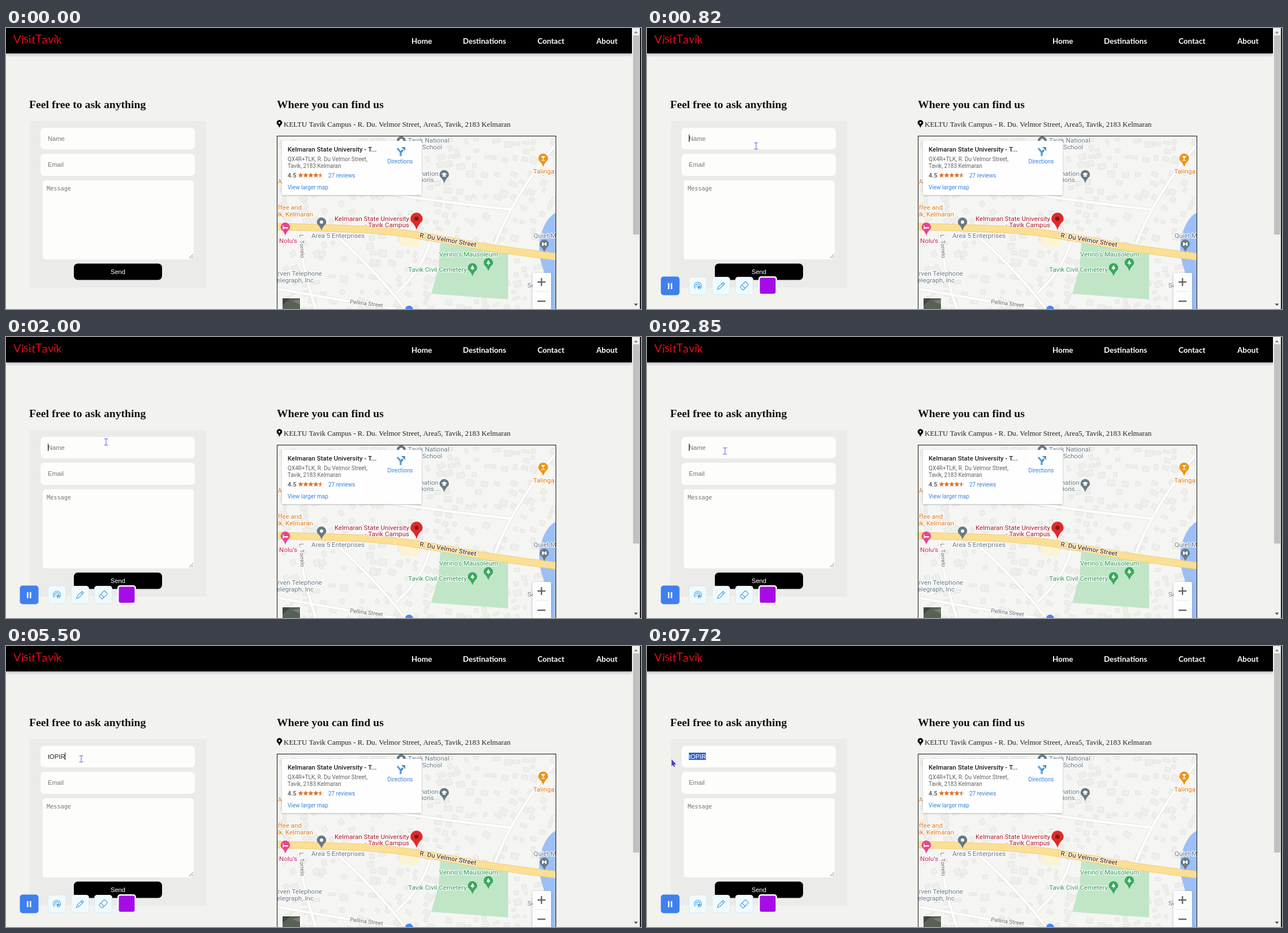
An HTML page with a canvas that plays this animation: 1123 px wide and 498 px high, repeating every 8 s.

```html
<!DOCTYPE html>
<html lang="en">
<head>
<meta charset="utf-8">
<title>Contact page</title>
<style>
html, body { margin: 0; width: 100%; height: 100%; overflow: hidden; background: #f2f2ef; }
canvas { display: block; width: 1123px; height: 498px; }
</style>
</head>
<body>
<canvas id="stage" width="1123" height="498"></canvas>
<script>
const W = 1123, H = 498, LOOP = 8000;
const SANS = '"Liberation Sans", Arial, sans-serif';
const SERIF = '"Liberation Serif", Times, serif';
const MONO = '"DejaVu Sans Mono", monospace';
const MAPFONT = 'Roboto, sans-serif';
const NAVFONT = 'Lato, sans-serif';
const PAGE = '#f2f2ef', LAND = '#f5f5f3', SLATE = '#677a86';
const GREEN = '#36985a', ORANGE = '#d97918';

const screen = document.getElementById('stage').getContext('2d');
const page = document.createElement('canvas');
page.width = W;
page.height = H;
let g = page.getContext('2d');

function text(str, x, y, font, color, align = 'left') {
  g.font = font;
  g.fillStyle = color;
  g.textAlign = align;
  g.fillText(str, x, y);
}

function box(x, y, w, h, color, r = 0) {
  g.fillStyle = color;
  g.beginPath();
  g.roundRect(x, y, w, h, r);
  g.fill();
}

function disc(x, y, r, color) {
  g.fillStyle = color;
  g.beginPath();
  g.arc(x, y, r, 0, Math.PI * 2);
  g.fill();
}

function trace(pts, close) {
  g.beginPath();
  pts.forEach(([x, y]) => g.lineTo(x, y));
  if (close) g.closePath();
}

function shape(pts, color) {
  trace(pts, true);
  g.fillStyle = color;
  g.fill();
}

function line(pts, color, width) {
  trace(pts);
  g.strokeStyle = color;
  g.lineWidth = width;
  g.stroke();
}

// Smooth stroke that runs through the midpoints of the inner key points.
function curve(pts, color, width) {
  g.beginPath();
  g.moveTo(...pts[0]);
  for (let i = 1; i < pts.length - 1; i++) {
    const [x, y] = pts[i], [nx, ny] = pts[i + 1];
    const k = i === pts.length - 2 ? 1 : 0.5;
    g.quadraticCurveTo(x, y, x + (nx - x) * k, y + (ny - y) * k);
  }
  g.strokeStyle = color;
  g.lineWidth = width;
  g.stroke();
}

function shadowed(blur, dy, color, draw) {
  g.save();
  g.shadowColor = color;
  g.shadowBlur = blur;
  g.shadowOffsetY = dy;
  draw();
  g.restore();
}

function turned(x, y, angle, draw) {
  g.save();
  g.translate(x, y);
  g.rotate(angle);
  draw();
  g.restore();
}

function clipped(x, y, w, h, draw) {
  g.save();
  g.beginPath();
  g.rect(x, y, w, h);
  g.clip();
  draw();
  g.restore();
}

function label(str, x, y, color, align = 'left', size = 11.6, weight = 400) {
  const font = `${weight} ${size}px ${MAPFONT}`;
  g.font = font;
  g.textAlign = align;
  g.lineJoin = 'round';
  g.lineWidth = 2.5;
  g.strokeStyle = 'rgba(255,255,255,.85)';
  g.strokeText(str, x, y);
  text(str, x, y, font, color, align);
}

function marker(x, y, r, color) {
  g.fillStyle = color;
  g.beginPath();
  g.arc(x, y, r, Math.PI * 0.88, Math.PI * 0.12);
  g.quadraticCurveTo(x + r * 0.25, y + r, x, y + r * 1.8);
  g.quadraticCurveTo(x - r * 0.25, y + r, x - r * 0.95, y + r * 0.37);
  g.fill();
}

function drawHeader() {
  shadowed(5, 2, 'rgba(80,70,110,.4)', () => box(0, 0, 1107, 45, '#000'));
  const font = '400 20px ' + NAVFONT;
  let x = 13;
  [...'VisitTavik'].forEach((ch, i) => {
    turned(x, 27 + Math.sin(i * 2.3), Math.sin(i * 1.9) * 0.07,
      () => text(ch, 0, 0, font, '#e00d18'));
    g.font = font;
    x += g.measureText(ch).width;
  });
  text('Home', 717, 28, '700 13.5px ' + NAVFONT, '#fff');
  text('Destinations', 808, 28, '700 13.5px ' + NAVFONT, '#fff');
  text('Contact', 940, 28, '700 13.5px ' + NAVFONT, '#fff');
  text('About', 1044, 28, '700 13.5px ' + NAVFONT, '#fff');
}

function drawForm() {
  text('Feel free to ask anything', 41, 142, 'bold 19.7px ' + SERIF, '#111');
  box(42, 165, 312, 295, '#ebebea');
  box(61, 177, 273, 38, '#fdfdfc', 7);
  box(61, 223, 273, 39, '#fdfdfc', 7);
  box(65, 270, 267, 140, '#fdfdfc', 5);
  text('Email', 74, 246, '11.2px ' + SANS, '#757575');
  text('Message', 72, 288, '10.2px ' + MONO, '#757575');
  line([[324, 408], [331, 401]], '#777', 1);
  line([[328, 408], [331, 405]], '#777', 1);
  box(120, 417.5, 156, 29, '#000', 7);
  text('Send', 198, 436, '11.2px ' + SANS, '#fff', 'center');
}

// Houses on a jittered grid, thinned at random and tilted like the land around them.
function drawHouses() {
  let seed = 29;
  const rnd = () => (seed = (seed * 16807) % 2147483647) / 2147483647;
  for (let y = 196; y < H; y += 14) {
    for (let x = 484; x < 968; x += 17) {
      if (rnd() > 0.5) continue;
      const w = 5 + rnd() * 9, h = 5 + rnd() * 7;
      turned(x + rnd() * 8, y + rnd() * 6, Math.sin(x / 90 + y / 70) * 0.5, () => {
        box(0, 0, w, h, '#eeeeec');
        g.strokeStyle = '#e2e1d8';
        g.lineWidth = 0.8;
        g.strokeRect(0, 0, w, h);
      });
    }
  }
}

function drawRoads() {
  const lanes = [
    [[517, 355], [522, 420], [548, 498]],
    [[572, 357], [650, 425], [706, 498]],
    [[862, 390], [895, 300], [973, 205]],
    [[640, 288], [750, 306], [894, 322]],
    [[479, 462], [600, 484], [690, 498]],
    [[690, 470], [735, 430], [750, 378]]
  ];
  lanes.forEach(p => curve(p, '#e0e0df', 6));
  lanes.forEach(p => curve(p, '#fefefe', 4.5));
  const main = [[474, 352], [600, 355], [690, 361], [780, 376], [860, 391], [978, 406]];
  curve(main, '#efcf78', 13);
  curve(main, '#fbdf94', 11);
}

function drawWater() {
  g.fillStyle = '#9cbff5';
  g.beginPath();
  g.moveTo(973, 327);
  g.bezierCurveTo(955, 335, 943, 365, 943, 390);
  g.bezierCurveTo(943, 425, 962, 440, 962, 498);
  g.lineTo(973, 498);
  g.fill();
}

function treeMarker(x, y) {
  marker(x, y, 8.3, '#39a85c');
  shape([[x - 3.5, y + 2], [x, y - 5], [x + 3.5, y + 2]], '#fff');
  box(x - 0.6, y + 2, 1.2, 2.5, '#fff');
}

function drawPlaces() {
  marker(699, 200, 8, SLATE);
  disc(699, 200, 3.5, '#fff');
  label('Tavik National', 784, 203, SLATE, 'right');
  label('School', 736, 215, SLATE);
  label('Examination', 765, 262, SLATE, 'right');
  label('Institutions...', 766, 273, SLATE, 'right');
  marker(775, 260, 8.3, SLATE);
  shape([[770, 259], [775, 256], [780, 259], [775, 262]], '#fff');
  box(772, 261.5, 6, 2, '#fff');

  marker(950, 231, 8.5, '#ee9513');
  shape([[946, 227], [954, 227], [950, 231.5]], '#fff');
  box(949.4, 230, 1.2, 5, '#fff');
  box(947, 234, 6, 1.2, '#fff');
  label('Talinga', 951, 258, ORANGE, 'center');
  label('A', 488, 276, ORANGE, 'right');
  label('Coffee and', 523, 322, ORANGE, 'right');
  label('Tavik, Kelmaran', 543, 334, ORANGE, 'right');

  marker(494, 353, 8.3, '#e8458b');
  box(489.5, 350, 1.3, 7, '#fff');
  box(490, 353, 9, 2.4, '#fff');
  label('Nolu\u2019s', 499, 381, '#c2235f', 'center');
  marker(558, 344, 8.3, SLATE);
  disc(558, 344, 3, '#fff');
  label('Area 5 Enterprises', 540, 372, SLATE);

  marker(952, 383, 8, SLATE);
  box(948, 380, 2.6, 6, '#fff');
  box(953.4, 380, 2.6, 6, '#fff');
  box(950, 382, 4, 2, '#fff');
  label('Quiet M', 933, 372, SLATE);
  label('Se', 922, 460, SLATE);

  label('Verino\u2019s Mausoleum', 766, 405, GREEN);
  label('Tavik Civil Cemetery', 815, 432, GREEN, 'right');
  treeMarker(853, 416);
  treeMarker(825, 425);

  label('Orven Telephone', 559, 439, SLATE, 'right');
  label('Telegraph, Inc', 544, 451, SLATE, 'right');
  turned(519, 366, Math.PI / 2 - 0.05, () => label('L. Torrelo', 0, 0, '#666', 'left', 10));
  turned(608, 488, 0.12, () => label('Pellina Street', 0, 0, '#666', 'left', 10));
  turned(731, 371, 0.17, () => label('R. Du Velmor Street', 0, 0, '#644023', 'left', 11.6, 500));

  marker(726, 338, 10.8, '#dd2b2b');
  disc(726, 338, 3.8, '#8c1518');
  label('Kelmaran State University', 713, 342, '#a9182b', 'right');
  label('- Tavik Campus', 713, 353, '#a9182b', 'right');
}

function star(cx, cy, r, color) {
  const pts = Array.from({ length: 10 }, (_, i) => {
    const a = -Math.PI / 2 + i * Math.PI / 5, d = i % 2 ? r * 0.45 : r;
    return [cx + d * Math.cos(a), cy + d * Math.sin(a)];
  });
  shape(pts, color);
}

function drawStars(color) {
  for (let i = 0; i < 5; i++) star(521 + i * 9, 261, 4.8, color);
}

function drawCard() {
  const small = '10px ' + MAPFONT, blue = '#3a82dc';
  shadowed(3, 1, 'rgba(0,0,0,.25)', () => box(488, 200, 247, 96, '#fefefe', 1));
  text('Kelmaran State University - T...', 498, 219, '500 11.5px ' + MAPFONT, '#1f1f1f');
  text('QX4R+TLK, R. Du Velmor Street,', 498, 236, small, '#636363');
  text('Tavik, 2183 Kelmaran', 498, 248, small, '#636363');
  text('4.5', 498, 265, '500 11px ' + MAPFONT, '#555');
  drawStars('#ddd');
  clipped(516, 255, 41, 12, () => drawStars('#e27126'));
  text('27 reviews', 570, 265, small, blue);
  text('View larger map', 498, 286, small, blue);
  text('Directions', 697, 240, small, blue, 'center');
  line([[698, 227], [698, 220], [692, 213]], '#5fa0d6', 3.4);
  line([[698, 221], [702, 216]], '#4a8fcd', 3.4);
  shape([[699, 211], [706, 211], [706, 218]], '#4a8fcd');
}

function drawControls() {
  shadowed(4, 1, 'rgba(0,0,0,.25)', () => box(931, 434, 33, 70, '#fdfdfd', 2));
  box(936, 466.5, 23, 1, '#e4e4e4');
  box(940, 449, 14, 2.4, '#666');
  box(945.8, 443.2, 2.4, 14, '#666');
  box(940, 483, 14, 2.4, '#666');
  box(487, 477, 35, 22, '#fff', 2);
  box(489, 479, 31, 20, '#596056');
  shape([[489, 479], [503, 479], [489, 491]], '#3e493d');
  shape([[506, 484], [520, 481], [520, 490]], '#7b7c70');
  disc(713, 499, 7, '#4c86ec');
}

function drawMap() {
  text('Where you can find us', 479, 142, 'bold 19.7px ' + SERIF, '#111');
  marker(483.5, 168, 4.9, '#000');
  disc(483.5, 168, 1.7, PAGE);
  text('KELTU Tavik Campus - R. Du. Velmor Street, Area5, Tavik, 2183 Kelmaran',
    491, 175, '13px ' + SERIF, '#222');
  clipped(479, 191, 494, 320, () => {
    box(479, 191, 494, 320, LAND);
    drawHouses();
    shape([[698, 368], [733, 373], [729, 389], [696, 386]], '#fcf3d3');
    shape([[768, 381], [888, 400], [888, 481], [752, 471], [765, 425]], '#c0e6c7');
    drawWater();
    drawRoads();
    drawPlaces();
    drawCard();
    drawControls();
  });
  g.strokeStyle = '#111';
  g.lineWidth = 1;
  g.strokeRect(479.5, 191.5, 493, 320);
}

function drawScrollbar() {
  box(1107, 0, 14, H, '#f1f1ef');
  box(1109, 13, 11, 353, '#c0c0c0');
  shape([[1110.5, 9.5], [1117.5, 9.5], [1114, 5.5]], '#8a8a8a');
  shape([[1110.5, 488.5], [1117.5, 488.5], [1114, 492.5]], '#505050');
  box(1121, 0, 2, H, '#1c1c1c');
}

function drawToolbar() {
  const ink = '#4ba3e3';
  box(24.5, 440.5, 33, 33, '#3f80ee', 5);
  box(37, 452, 2.6, 11, '#fff', 1);
  box(42, 452, 2.6, 11, '#fff', 1);
  for (let x = 74; x < 160; x += 41) {
    box(x, 441, 32, 32, '#d6ebf3', 5);
    box(x + 1, 442, 30, 30, '#f0fafd', 4);
  }
  g.strokeStyle = ink;
  g.lineWidth = 1.2;
  for (const r of [6.5, 3.6]) {
    g.beginPath();
    g.arc(90, 457, r, Math.PI * 0.75, Math.PI * 2.35);
    g.stroke();
  }
  shape([[89, 456], [96, 459], [92.5, 460.5], [91, 464]], ink);
  turned(131, 457, Math.PI / 4, () => {
    trace([[-2, -7], [2, -7], [2, 5], [0, 9], [-2, 5]], true);
    g.stroke();
    line([[-2, -4], [2, -4]], ink, 1.2);
  });
  turned(172, 457, -Math.PI / 4, () => {
    g.beginPath();
    g.roundRect(-7, -4, 14, 8, 1.5);
    g.stroke();
    line([[-2, -4], [-2, 4]], ink, 1.2);
  });
  box(197, 440, 33, 33, '#fdfdfd', 5);
  box(199.5, 442.5, 28, 28.5, '#a60de6', 3);
}

const TYPED = 'tOPIR', TYPE_START = 4830, KEY_GAP = 167;
const FOCUS = 670, REFOCUS = 3380, BLINK = 530, SELECT = 7410;
// Each move: start, end, and where the pointer comes to rest.
const MOVES = [
  [210, 640, 193, 209], [1140, 1240, 189, 200], [1730, 2000, 177, 186],
  [2330, 2850, 138, 202], [3140, 3300, 133, 200], [6560, 6990, 107, 198],
  [SELECT, 7720, 44, 207]
];

function pointerAt(t) {
  let x = 290, y = 300;
  for (const [from, to, nx, ny] of MOVES) {
    const k = Math.min(1, Math.max(0, (t - from) / (to - from)));
    const ease = k * k * (3 - 2 * k);
    x += (nx - x) * ease;
    y += (ny - y) * ease;
  }
  return [x, y];
}

// The blink starts anew with each click and each key.
function caretOn(t, count) {
  const lastKey = TYPE_START + (count - 1) * KEY_GAP;
  const since = t - (count ? lastKey : t >= REFOCUS ? REFOCUS : FOCUS);
  return since >= 0 && Math.floor(since / BLINK) % 2 === 0;
}

function drawName(t, px) {
  const font = '11.2px ' + SANS;
  const keys = Math.floor((t - TYPE_START) / KEY_GAP) + 1;
  const count = Math.max(0, Math.min(TYPED.length, keys));
  const typed = TYPED.slice(0, count);
  text(typed || 'Name', 74, 199.5, font, typed ? '#222' : '#757575');
  const end = 74 + g.measureText(typed).width;
  if (t >= SELECT) {
    const from = Math.max(74, Math.min(px, end));
    clipped(from, 189, end - from, 13, () => {
      box(from, 189, end - from, 13, '#3564cb');
      text(typed, 74, 199.5, font, '#fff');
    });
  } else if (caretOn(t, count)) {
    box(Math.round(end), 189, 1, 13, '#111');
  }
}

function drawPointer(x, y) {
  if (x < 61) {
    const arrow = [[0, -6], [0, 6], [2.6, 3.7], [4.4, 7.4], [6, 6.6], [4.4, 3], [8, 2.7]];
    turned(x - 0.5, y, 0, () => shape(arrow, '#4636d8'));
    return;
  }
  const ink = '#8272dc';
  line([[x, y - 5], [x, y + 5]], ink, 1.2);
  for (const dy of [-5.5, 5.5]) line([[x - 3.5, y + dy], [x + 3.5, y + dy]], ink, 1.2);
}

function frame() {
  const t = (performance.now() - start) % LOOP;
  const [px, py] = pointerAt(t);
  g.drawImage(page, 0, 0);
  drawName(t, px);
  if (t >= 60) drawToolbar();
  if (t >= 210) drawPointer(px, py);
  requestAnimationFrame(frame);
}

box(0, 0, W, H, PAGE);
drawHeader();
drawForm();
drawMap();
drawScrollbar();
g = screen;
const start = performance.now();
frame();
</script>
</body>
</html>
```
